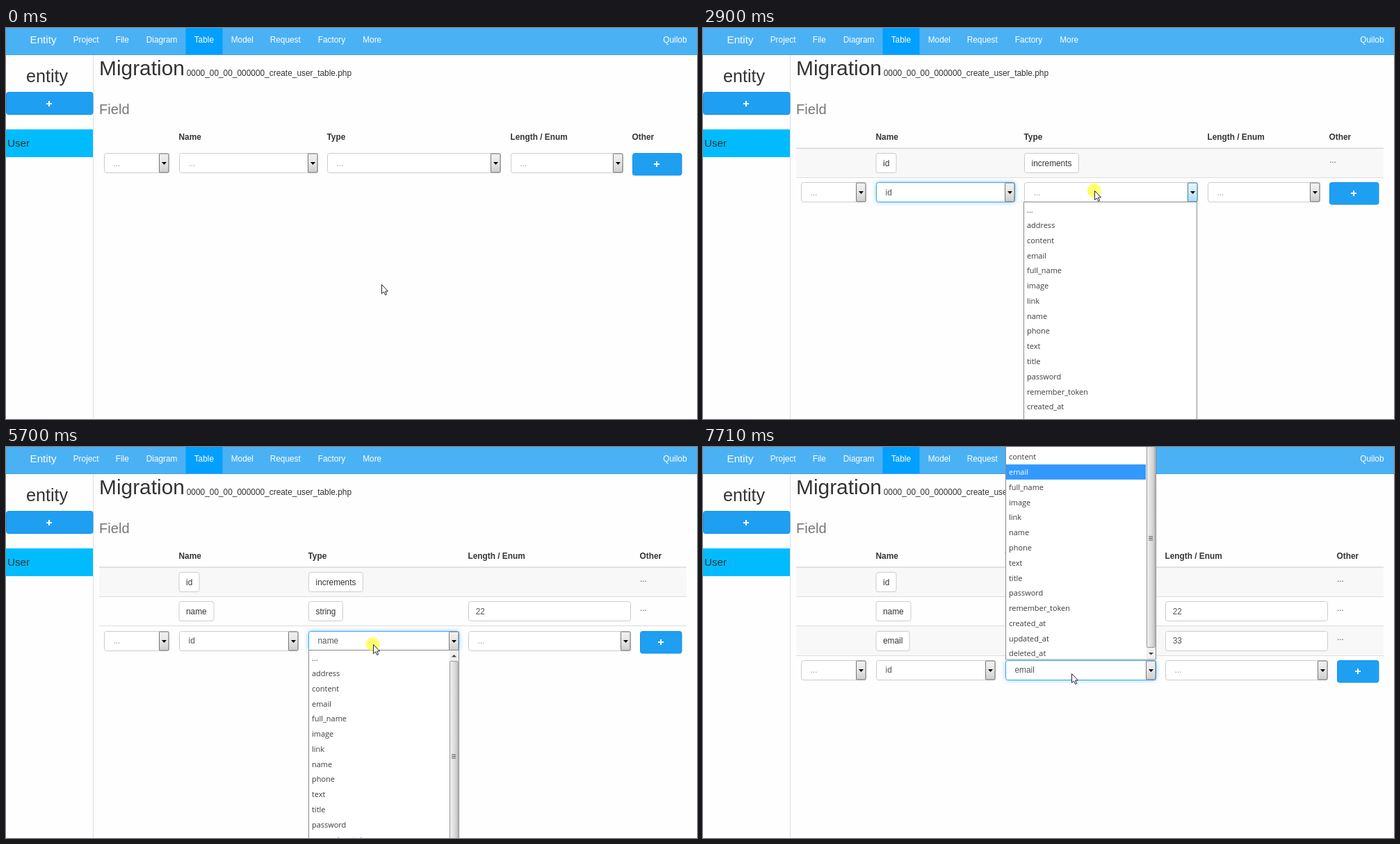
Write an HTML page with a canvas that moves like this. It is 994x563 px and loops after 8000 ms.

```html
<!DOCTYPE html>
<html lang="en">
<head>
<meta charset="utf-8">
<title>Migration</title>
<style>
html, body { margin: 0; width: 100%; height: 100%; overflow: hidden; background: #fefefe; }
canvas { display: block; }
</style>
</head>
<body>
<canvas id="stage" width="994" height="563"></canvas>
<script>
const ctx = document.getElementById('stage').getContext('2d');
const LOOP = 8000, TICK = 78, ROW = 42.2, ITEM = 21.77;
const SANS = '"Liberation Sans", Arial, sans-serif';
const MENU = '10.95px "Open Sans", "Noto Sans", sans-serif';
const BODY = 11.85;

const NAMES = '... id age sex sort status type category_id parent_id post_id tag_id user_id'.split(' ');
const TYPES = ('... address content email full_name image link name phone text title password ' +
  'remember_token created_at updated_at deleted_at').split(' ');

const NAV = [['Project', 97], ['File', 158], ['Diagram', 202], ['Table', 271], ['Model', 324],
  ['Request', 380], ['Factory', 449], ['More', 513.5]];

// Column edges: [left, right] for action, name, type, length, other
const NARROW = [[141, 235], [249, 449], [462, 712], [726, 888], [901, 972.5]];
const WIDE = [[141, 235], [249, 421], [435, 652], [665, 899], [912, 972.5]];

const ROWS = [
  { at: 1960, name: 'id', type: 'increments' },
  { at: 4850, name: 'name', type: 'string', length: '22' },
  { at: 7010, name: 'email', type: 'string', length: '33' }
];

const LISTS = [
  { from: 780, to: 1960, x: 248.5, w: 199, top: 208.5, bottom: 470.5, items: NAMES, selected: 0 },
  { from: 2900, to: 4850, x: 461.5, w: 249, top: 250.5, bottom: 600, items: TYPES, selected: 0 },
  { from: 5700, to: 7010, x: 435.5, w: 216, top: 292.5, bottom: 610, items: TYPES, selected: 7, thumb: [308, 582] },
  { from: 7630, to: LOOP, x: 435.5, w: 216, top: -10, bottom: 306, items: TYPES, selected: 3, scroll: 31, thumb: [-26, 288] }
];

const CLICKS = [[780, 940], [1880, 1960], [2900, 3050], [4770, 4850], [5700, 5780], [6930, 7010], [7630, 7710]];

// Pointer moves: start, ticks, x, y
const MOVES = [[80, 7, 378, 197], [1250, 6, 376, 247], [2190, 7, 563, 234], [3670, 11, 559, 404.5],
  [4530, 2, 557, 409], [4930, 7, 528, 284], [6240, 6, 529, 380], [7090, 6, 530, 326]];

function pointerAt(t) {
  let x = 539.5, y = 369;
  for (const [start, ticks, toX, toY] of MOVES) {
    if (t < start) break;
    const p = Math.min(1, Math.floor((t - start) / TICK + 1.1) / ticks);
    const e = Math.sin(p * Math.PI / 2);
    x += (toX - x) * e;
    y += (toY - y) * e;
  }
  return [Math.round(x), Math.round(y)];
}

function rect(x, y, w, h, fill) {
  ctx.fillStyle = fill;
  ctx.fillRect(x, y, w, h);
}

function box(x, y, w, h, fill, stroke, radius = 3) {
  ctx.beginPath();
  ctx.roundRect(x, y, w, h, radius);
  ctx.fillStyle = fill;
  ctx.fill();
  ctx.shadowBlur = 0;
  ctx.strokeStyle = stroke;
  ctx.lineWidth = 1;
  ctx.stroke();
}

function text(s, x, y, color = '#333', size = BODY, weight = '') {
  ctx.font = `${weight} ${size}px ${SANS}`;
  ctx.fillStyle = color;
  ctx.fillText(s, x, y);
}

function polygon(points, fill) {
  ctx.beginPath();
  points.forEach(([x, y]) => ctx.lineTo(x, y));
  ctx.closePath();
  ctx.fillStyle = fill;
  ctx.fill();
}

function plusButton(left, right, y, h) {
  box(left + .5, y + .5, right - left - 1, h - 1, '#1f9ff2', '#1693e8');
  const x = Math.round((left + right) / 2 - .5), cy = Math.round(y + h / 2);
  rect(x - 4, cy - 1, 8, 2, '#fff');
  rect(x - 1, cy - 4, 2, 8, '#fff');
}

function selectBox([left, right], y, base, value, focused, hot) {
  const w = right - left - 1;
  if (focused) {
    ctx.shadowColor = 'rgba(85,180,250,.8)';
    ctx.shadowBlur = 6.7;
  }
  box(left + .5, y + .5, w, 28, '#fff', focused ? '#3aa8f2' : '#ccc');
  text(value, left + 13.5, base, value === '...' ? '#999' : '#555');
  const shade = ctx.createLinearGradient(0, y, 0, y + 28);
  shade.addColorStop(0, hot ? '#e6f5fd' : '#f2f2f2');
  shade.addColorStop(.5, hot ? '#d2edfb' : '#e6e6e6');
  shade.addColorStop(1, hot ? '#addcf5' : '#cdcdcd');
  box(right - 14.5, y + 1, 13.5, 27, shade, hot ? '#3c7fb1' : '#777', 1);
  polygon([[right - 11, y + 13], [right - 4, y + 13], [right - 7.5, y + 17]], '#000');
}

function label(s, x, y, base) {
  ctx.font = `${BODY}px ${SANS}`;
  box(x + .5, y + .5, Math.round(ctx.measureText(s).width + 20), 28, '#fff', '#ccc');
  text(s, x + 10.5, base);
}

function page() {
  rect(0, 0, 994, 563, '#fefefe');
  rect(0, 0, 994, 38, '#4bb1f5');
  rect(0, 38, 994, 1, '#37a5ee');
  rect(258.5, 0, 53, 38, '#019ffe');
  text('Entity', 34.5, 22, '#fff', 15.2);
  NAV.forEach(([s, x]) => text(s, x - .3, 21, '#fff'));
  ctx.textAlign = 'right';
  text('Quilob', 979.5, 21, '#fff');
  ctx.textAlign = 'center';
  text('entity', 59, 78, '#333', 25.2);
  ctx.textAlign = 'left';
  rect(125, 39, 1, 524, '#ddd');
  plusButton(0, 125.5, 92, 33);
  rect(0, 146, 125, 40, '#00bcff');
  text('User', 2, 171, '#333', 15.2);
  text('Migration', 134, 68, '#333', 29.9);
  text('0000_00_00_000000_create_user_table.php', 259.7, 69, '#333', 11.9);
  text('Field', 134, 124, '#777', 20.1);
}

function table(t) {
  const rows = ROWS.filter(r => t >= r.at);
  const cols = rows.length > 1 ? WIDE : NARROW;
  const boxTop = i => Math.round(180.2 + i * ROW);
  const baseline = i => Math.round(198.6 + i * ROW);
  ['', 'Name', 'Type', 'Length / Enum', 'Other'].forEach((s, i) =>
    text(s, cols[i][0] - .5, 161, '#333', BODY, 'bold'));

  rows.forEach((r, i) => {
    const top = 173 + i * ROW, y = boxTop(i), base = baseline(i);
    if (i % 2 === 0) rect(134, top, 845, ROW, '#f8f8f8');
    rect(134, Math.round(top) - (i ? 0 : .7), 845, i ? 1 : 1.7, '#ddd');
    label(r.name, cols[1][0] - .5, y, base);
    label(r.type, cols[2][0], y, base);
    if (r.length) {
      const [l, right] = cols[3];
      box(l + .5, y + .5, right - l - 1, 28, '#fff', '#ccc');
      text(r.length, l + 10.7, base, '#555');
    }
    text('...', cols[4][0], base - 5, '#555');
  });
  if (rows.length) rect(134, Math.round(173 + rows.length * ROW), 845, 1, '#ddd');

  const y = boxTop(rows.length), base = baseline(rows.length);
  const focus = t < 860 ? 0 : t < 2970 ? 1 : 2;
  const open = t >= 780 && t < 1960 ? 1 : t >= 2900 && t < 4850 ? 2 : 0;
  const values = ['...', t < 1960 ? '...' : 'id', t < 4850 ? '...' : t < 7010 ? 'name' : 'email', '...'];
  values.forEach((v, i) => selectBox(cols[i], y, base, v, focus && focus === i, open && open === i));
  plusButton(...cols[4], y, 32.5);
}

function scrollbar(x, list) {
  rect(x, list.top, 13, list.bottom - list.top, '#f0f0f0');
  const [start, end] = list.thumb, mid = (start + end) / 2;
  const shade = ctx.createLinearGradient(x, 0, x + 13, 0);
  shade.addColorStop(0, '#f3f3f3');
  shade.addColorStop(.5, '#dedede');
  shade.addColorStop(1, '#c4c4c4');
  box(x + .5, start + .5, 11.5, end - start, shade, '#979797', 1);
  for (let i = -1; i < 2; i++) rect(x + 3, mid + i * 2.5, 6, 1, '#555');
  const up = list.top + 10, down = list.bottom - 10;
  polygon([[x + 3, up], [x + 10, up], [x + 6.5, up - 3.5]], '#444');
  polygon([[x + 3, down], [x + 10, down], [x + 6.5, down + 3.5]], '#444');
}

function menu(list, t, py) {
  const { x, w, top, bottom, items, selected, scroll = 0 } = list;
  const first = top + .8 - scroll;
  const inside = py > top && py < bottom;
  const hover = t - list.from < 70 ? -1 : inside ? Math.floor((py - first) / ITEM) : selected;
  ctx.save();
  ctx.beginPath();
  ctx.rect(x - .5, top - .5, w + 1, bottom - top + 1);
  ctx.clip();
  rect(x, top, w, bottom - top, '#fff');
  items.forEach((s, i) => {
    const y = first + i * ITEM;
    if (i === hover) rect(x + .5, y, w - (list.thumb ? 15 : 1), ITEM, '#3399ff');
    ctx.font = MENU;
    ctx.fillStyle = i === hover ? '#fff' : '#3c3c3c';
    ctx.fillText(s, x + 4.5, Math.round(y) + 15);
  });
  if (list.thumb) scrollbar(x + w - 13.5, list);
  ctx.strokeStyle = '#8a8a8a';
  ctx.lineWidth = 1;
  ctx.strokeRect(x, top, w, bottom - top);
  ctx.restore();
}

function pointer(x, y, pressed) {
  if (pressed) {
    ctx.beginPath();
    ctx.arc(x - .5, y, 10, 0, 7);
    ctx.fillStyle = 'rgba(255,255,0,.57)';
    ctx.fill();
  }
  polygon([[0, 0], [0, 13], [3, 10.4], [5.2, 15], [7.2, 14.1], [5.1, 9.6], [9, 9.5]]
    .map(([dx, dy]) => [x + .5 + dx, y + .5 + dy]), '#fff');
  ctx.strokeStyle = '#23232d';
  ctx.lineWidth = 1;
  ctx.stroke();
}

function draw(now) {
  const t = now % LOOP;
  const during = ([from, to]) => t >= from && t < to;
  const [px, py] = pointerAt(t);
  page();
  table(t);
  const list = LISTS.find(l => during([l.from, l.to]));
  if (list) menu(list, t, py);
  pointer(px, py, CLICKS.some(during));
}

const start = performance.now();
function loop() {
  draw(performance.now() - start);
  requestAnimationFrame(loop);
}
loop();
</script>
</body>
</html>
```
